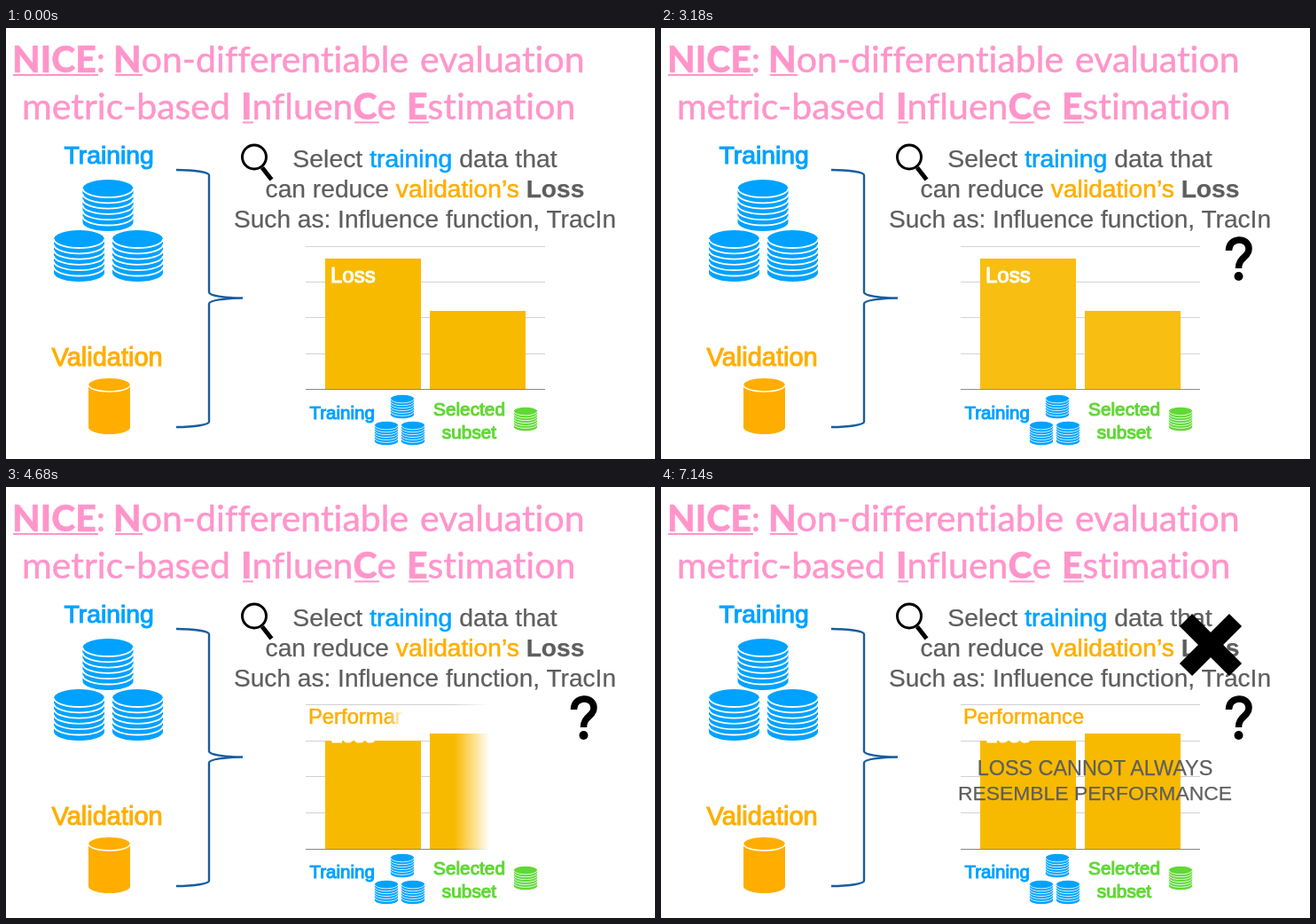
An HTML page for the animation above (8 s loop, 732x486 px).

```html
<!DOCTYPE html>
<html lang="en">
<head>
<meta charset="utf-8">
<title>NICE</title>
<style>
  html, body { margin: 0; width: 100%; height: 100%; overflow: hidden; background: #fff; }
  svg { display: block; width: 732px; height: 486px; }
  text { font-family: "Liberation Sans", Arial, sans-serif; fill: currentColor; }
  .title text { font: 41px Lato, sans-serif; font-variant-ligatures: none; stroke: currentColor; stroke-width: .5; }
  .title tspan { font-weight: 800; }
  .book { stroke: currentColor; stroke-width: .25; }
  .medium { stroke: currentColor; stroke-width: 1.1; }
  .semi { stroke: currentColor; stroke-width: .6; }
  .middle { text-anchor: middle; }
  .blue { color: #00a2ff; fill: #00a2ff; }
  .orange { color: #ffae00; fill: #ffae00; }
  .green { color: #61d836; fill: #61d836; }
  .gray { color: #5e5e5e; }
  .pink { color: #ff95ca; }
  .line { fill: none; stroke: #000; }
  .grid { fill: none; stroke: #d2d2d2; }
  .axis { fill: none; stroke: #868686; }
  .bars { fill: #f8ba00; }
  .white { color: #fff; }
</style>
</head>
<body>
<svg viewBox="0 0 732 486">
  <defs id="defs">
    <g id="stack">
      <path d="M-28.5-19A28.5 10 0 0 1 28.5-19V19A28.5 10 0 0 1-28.5 19Z"/>
      <path id="rims" fill="none" stroke="#fff" stroke-width="1.8"/>
    </g>
    <use id="smallStack" href="#stack" transform="scale(.46)"/>
  </defs>

  <g class="title pink">
    <text x="7" y="50"><tspan>NICE</tspan>:</text>
    <text x="121" y="50"><tspan>N</tspan>on-differentiable</text>
    <text x="467" y="50">evaluation</text>
    <text x="18" y="103">metric-based</text>
    <text x="265" y="103"><tspan>I</tspan>nfluen<tspan>C</tspan>e</text>
    <text x="452" y="103"><tspan>E</tspan>stimation</text>
    <path d="M8 53H104M123 53H154M267 106.500H279M393 106.500H421M454 106.500H477" stroke="currentColor" stroke-width="2"/>
  </g>

  <g class="blue">
    <text class="medium" x="65.500" y="152.500" font-size="28.300">Training</text>
    <use href="#stack" x="115" y="200"/>
    <use href="#stack" x="82.500" y="257"/>
    <use href="#stack" x="148.500" y="257"/>
  </g>
  <g class="orange">
    <text class="medium" x="51.500" y="381" font-size="29">Validation</text>
    <path d="M93 402.500A23.500 7.500 0 0 1 140 402.500V450.500A23.500 7.500 0 0 1 93 450.500Z"/>
    <path d="M93 402.500a23.500 7.500 0 0 0 47 0" fill="none" stroke="#fff" stroke-width="1.500"/>
  </g>
  <path d="M192 160A37 6 0 0 1 229 166V298A38 6.500 0 0 0 267 304.500A38 6.500 0 0 0 229 311V444A37 6 0 0 1 192 450"
    fill="none" stroke="#175d9f" stroke-width="2.400"/>

  <circle class="line" cx="280" cy="145.500" r="13.500" stroke-width="3"/>
  <path class="line" d="M289 157.500L299.500 171" stroke-width="5"/>
  <g class="gray middle book">
    <text x="472.500" y="157" font-size="28.400">Select <tspan class="blue semi">training</tspan> data that</text>
    <text x="472.500" y="191" font-size="28.200">can reduce <tspan class="orange semi">validation’s</tspan> <tspan font-weight="700">Loss</tspan></text>
    <text x="472.500" y="225" font-size="28.100">Such as: Influence function, TracIn</text>
  </g>

  <g class="blue">
    <text class="medium" x="342.500" y="441" font-size="20.500">Training</text>
    <use href="#smallStack" x="447" y="427"/>
    <use href="#smallStack" x="429" y="457"/>
    <use href="#smallStack" x="459" y="457"/>
  </g>
  <g class="green middle">
    <text class="medium" x="522.500" y="437" font-size="20.800">Selected</text>
    <text class="medium" x="522.500" y="462.500" font-size="20.800">subset</text>
    <use href="#smallStack" x="586" y="441"/>
  </g>

  <g id="lossChart">
    <path class="grid" d="M338 246.500H608M338 286.500H608M338 326.500H608M338 367.500H608"/>
    <path class="bars" d="M360 260H468V407H360ZM478 319H586V407H478Z"/>
    <path class="axis" d="M338 407.500H608"/>
    <text class="white medium" x="366" y="286.500" font-size="24">Loss</text>
  </g>

  <g id="perfChart">
    <path class="grid" d="M338 245.500H608M338 286.500H608M338 326.500H608M338 367.500H608"/>
    <path class="bars" d="M360 286H468V408H360ZM478 278H586V408H478Z"/>
    <path class="axis" d="M338 408.500H608"/>
    <text class="white medium" x="366" y="287.500" font-size="24">Loss</text>
  </g>
  <g id="perfLabel" class="orange semi">
    <text x="341" y="267" font-size="23.800">Performance</text>
  </g>
  <g id="howsLabel" class="orange middle semi" font-size="23.800">
    <text x="554.500" y="253">How’s</text>
    <text x="554.500" y="281">Performance</text>
  </g>
  <g id="question">
    <path class="line" d="M640.500 251C640 235.500 663 235 663 249C663 259 651.500 258 651.500 271" stroke-width="7.500"/>
    <circle cx="651.500" cy="280" r="5"/>
  </g>
  <g id="verdict" class="gray middle book">
    <text x="489.500" y="325" font-size="23.400">LOSS CANNOT ALWAYS</text>
    <text x="489.500" y="353" font-size="22.900">RESEMBLE PERFORMANCE</text>
  </g>
  <path id="cross" class="line" d="M-28-28L28 28M28-28L-28 28" stroke-width="20"/>
</svg>

<script>
const LOOP = 8000;
const byId = id => document.getElementById(id);
const progress = (t, start, end) => Math.min(1, Math.max(0, (t - start) / (end - start)));

byId('rims').setAttribute('d', Array.from({ length: 6 },
  (_, i) => `M-28.5 ${-19 + 6.3 * i}a28.5 10 0 0 0 57 0`).join(''));

// Left-to-right reveal whose soft edge travels from x0 to x1.
function makeWipe(id, start, end, x0, x1, soft) {
  byId('defs').insertAdjacentHTML('beforeend', `
    <linearGradient id="${id}Edge" gradientUnits="userSpaceOnUse" y1="0" y2="0">
      <stop offset="0" stop-color="#fff"/><stop offset="1" stop-color="#000"/>
    </linearGradient>
    <mask id="${id}Mask" maskUnits="userSpaceOnUse" x="0" y="0" width="732" height="486">
      <rect width="732" height="486" fill="url(#${id}Edge)"/>
    </mask>`);
  const group = byId(id), edge = byId(id + 'Edge');
  group.setAttribute('mask', `url(#${id}Mask)`);
  return t => {
    const p = progress(t, start, end), front = x0 + (x1 - x0) * p;
    group.style.visibility = p > 0 ? 'visible' : 'hidden';
    edge.setAttribute('x1', front - soft);
    edge.setAttribute('x2', front);
  };
}

const wipes = [
  makeWipe('howsLabel', 1380, 2250, 487, 645, 22),
  makeWipe('perfChart', 4110, 4950, 320, 652, 40),
  makeWipe('perfLabel', 4110, 4950, 346, 497, 18),
  makeWipe('verdict', 5430, 7140, 335, 690, 46),
];

// Height above the resting place: a free fall, then ever smaller bounces.
function dropHeight(t) {
  const fall = 355, ratio = 0.2;
  let height = 213, half = fall, apex = 0;
  for (let i = 0; i < 4; i++) {
    if (t <= apex + half) return height * (1 - ((t - apex) / half) ** 2);
    const next = half * Math.sqrt(ratio);
    apex += half + next;
    half = next;
    height *= ratio;
  }
  return 0;
}

function draw(t) {
  wipes.forEach(wipe => wipe(t));
  if (t >= 3180) byId('howsLabel').style.visibility = 'hidden';
  byId('question').style.opacity = progress(t, 660, 1140);
  byId('lossChart').style.opacity = 1 - progress(t, 3150, 3600);
  const y = t < 5430 ? -100 : 178 - dropHeight(t - 5430);
  byId('cross').setAttribute('transform', `translate(620 ${y})`);
}

const begin = performance.now();
function tick() {
  draw((performance.now() - begin) % LOOP);
  requestAnimationFrame(tick);
}
tick();
</script>
</body>
</html>
```
